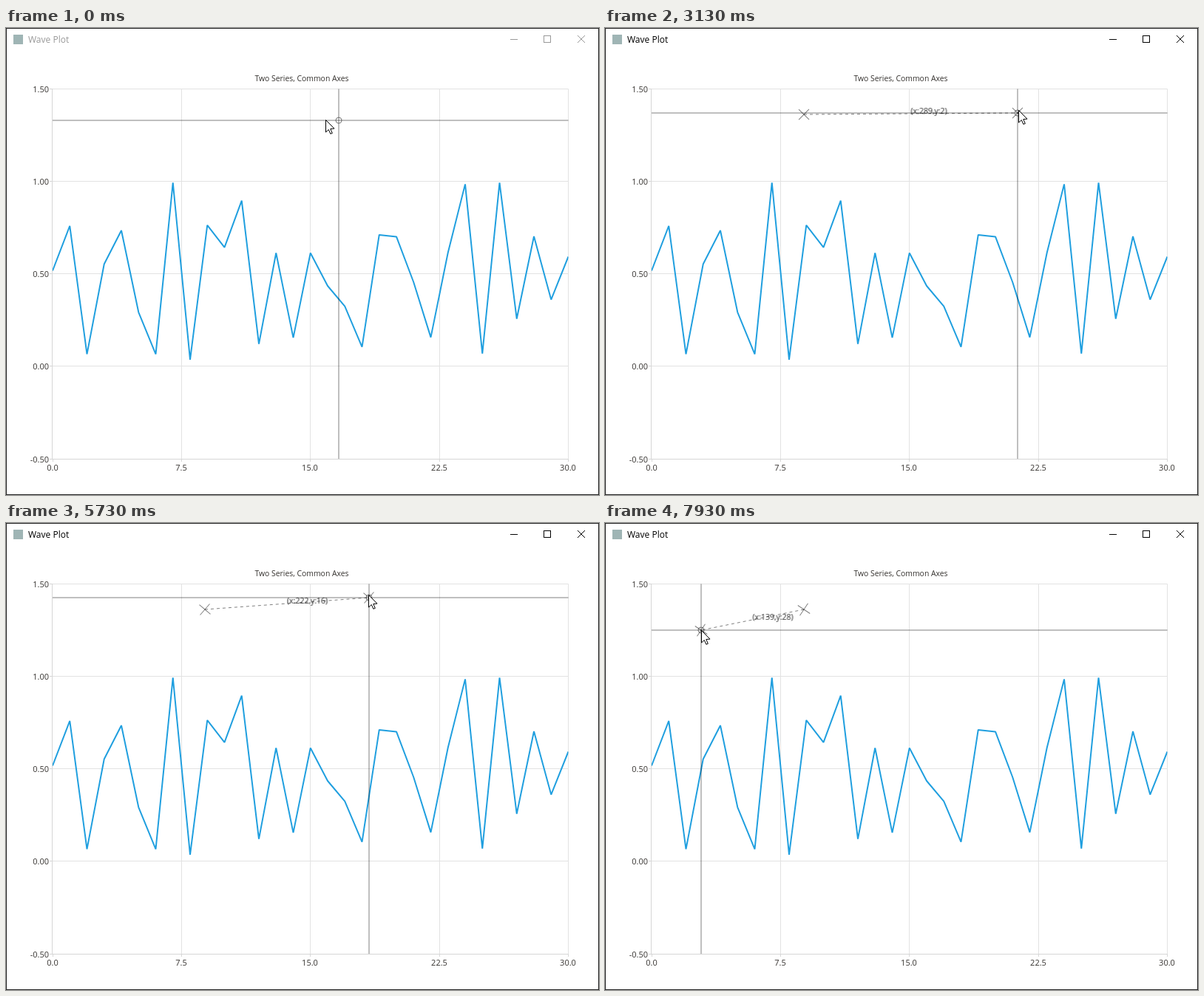
Recreate the animation shown at these times as an HTML page with a canvas. Size 802x632 px, loop 8 s.

```html
<!DOCTYPE html>
<html lang="en">
<head>
<meta charset="utf-8">
<title>Wave Plot</title>
<style>
  html, body { margin: 0; width: 100%; height: 100%; overflow: hidden; background: #fff; }
  canvas { display: block; }
</style>
</head>
<body>
<canvas id="stage" width="802" height="632"></canvas>
<script>
const ctx = document.getElementById('stage').getContext('2d');
const W = 802, H = 632, LOOP = 8000, STEP = 1000 / 15;
const PLOT = { left: 63, top: 82.5, right: 760.5, bottom: 583 };
const Y_MAX = 1.5, Y_SPAN = 2, X_SPAN = 30;
const FONT = '"Open Sans", "Noto Sans", sans-serif';
const SHADE = 'rgba(0,0,0,0.5)';
const ACTIVE_STEP = 14, PRESS_STEP = 15;
const ANCHOR = { x: 269, y: 117 };

// Plotted samples, one per unit of x
const SERIES = [
  .517, .759, .066, .553, .735, .293, .066, .993, .036, .763, .643,
  .896, .121, .613, .155, .613, .435, .325, .105, .711, .701,
  .455, .157, .615, .985, .069, .993, .257, .703, .361, .593
];

// Key points of the drag: step, x, y; a repeated point is a rest
const PATH = [
  [0, 450, 125], [11, 269, 117], [20, 269, 117], [35, 480, 205],
  [49, 560, 110], [53, 560, 110], [60, 486, 219], [86, 491, 101],
  [92, 480, 85], [104, 345, 241], [119, 130, 145]
];

const slope = (a, b, k) => (b[k] - a[k]) / (b[0] - a[0]);

// Tangent of the parabola through neighbouring points, zero at rests
function tangent(i, k) {
  const prev = PATH[i - 1], here = PATH[i], next = PATH[i + 1];
  if (!next) return 0;
  const after = slope(here, next, k);
  if (!prev) return after;
  const before = slope(prev, here, k);
  if (!before || !after) return 0;
  const w = (here[0] - prev[0]) / (next[0] - prev[0]);
  return before * (1 - w) + after * w;
}

function pointAt(step) {
  step = Math.min(step, PATH[PATH.length - 1][0]);
  let i = 0;
  while (i < PATH.length - 2 && PATH[i + 1][0] <= step) i++;
  const a = PATH[i], b = PATH[i + 1], span = b[0] - a[0];
  const s = (step - a[0]) / span, r = 1 - s;
  const ease = s * s * (3 - 2 * s);
  const axis = k => Math.round(a[k] + (b[k] - a[k]) * ease +
    span * s * r * (tangent(i, k) * r - tangent(i + 1, k) * s));
  return { x: axis(1), y: axis(2) };
}

function line(x1, y1, x2, y2) {
  ctx.beginPath();
  ctx.moveTo(x1, y1);
  ctx.lineTo(x2, y2);
  ctx.stroke();
}

function text(str, x, y, size, align = 'left') {
  ctx.font = `${size}px ${FONT}`;
  ctx.textAlign = align;
  ctx.fillText(str, x, y);
}

function drawWindow(active) {
  ctx.fillStyle = '#fff';
  ctx.fillRect(0, 0, W, H);
  ctx.lineWidth = 1;
  ctx.strokeStyle = '#222';
  ctx.strokeRect(0.5, 0.5, W - 1, H - 1);

  ctx.fillStyle = '#9fb5b5';
  ctx.fillRect(10, 9, 13, 13);

  ctx.fillStyle = ctx.strokeStyle = active ? '#000' : '#999';
  text('Wave Plot', 30, 20, 12);
  line(682, 15.5, 692, 15.5);
  ctx.strokeRect(727.5, 10.5, 9, 9);
  line(773, 10, 783, 20);
  line(783, 10, 773, 20);
}

function drawAxes() {
  const { left, top, right, bottom } = PLOT;
  ctx.lineWidth = 1;
  ctx.fillStyle = '#35322f';
  text('Two Series, Common Axes', 400, 72, 10.4, 'center');

  for (let i = 0; i <= 4; i++) {
    const x = Math.floor(left + (right - left) * i / 4);
    const y = Math.floor(top + (bottom - top) * i / 4);
    ctx.strokeStyle = '#e2e2e2';
    if (i > 0) line(x + 0.5, top, x + 0.5, bottom);
    if (i < 4) line(left, y + 0.5, right, y + 0.5);
    ctx.strokeStyle = '#d6d6d6';
    line(x + 0.5, bottom, x + 0.5, bottom + 4);
    line(left - 4, y + 0.5, left, y + 0.5);
    text((Y_MAX - Y_SPAN * i / 4).toFixed(2), 58, y + 5, 11, 'right');
    text((X_SPAN * i / 4).toFixed(1), x, 599, 11, 'center');
  }
  line(left - 0.5, top, left - 0.5, bottom);
  line(left, bottom + 0.5, right, bottom + 0.5);
}

function drawSeries() {
  const { left, top, right, bottom } = PLOT;
  ctx.save();
  ctx.beginPath();
  ctx.rect(left, top, right - left, bottom - top);
  ctx.clip();
  ctx.beginPath();
  SERIES.forEach((v, i) => ctx.lineTo(
    left + (right - left) * i / X_SPAN,
    top + (bottom - top) * (Y_MAX - v) / Y_SPAN));
  ctx.strokeStyle = '#209fdf';
  ctx.lineWidth = 2;
  ctx.lineJoin = 'bevel';
  ctx.stroke();
  ctx.restore();
}

function drawCrosshair({ x, y }) {
  ctx.lineWidth = 1;
  ctx.strokeStyle = SHADE;
  line(x, PLOT.top, x, PLOT.bottom);
  line(PLOT.left, y, PLOT.right, y);
  ctx.beginPath();
  ctx.arc(x, y, 4, 0, Math.PI * 2);
  ctx.stroke();
}

function drawMark({ x, y }, angle) {
  ctx.save();
  ctx.translate(x, y);
  ctx.rotate(angle);
  line(-7, -7, 7, 7);
  line(-7, 7, 7, -7);
  ctx.restore();
}

function drawRuler(end) {
  const dx = end.x - ANCHOR.x, dy = end.y - ANCHOR.y;
  ctx.lineWidth = 1;
  ctx.strokeStyle = SHADE;
  if (dx || dy) {
    const angle = Math.atan2(dy, dx);
    drawMark(ANCHOR, angle);
    drawMark(end, angle);
    ctx.setLineDash([4, 4]);
    line(ANCHOR.x, ANCHOR.y, end.x, end.y);
    ctx.setLineDash([]);
  }
  const label = `(x:${Math.abs(dx)},y:${Math.abs(dy)})`;
  const x = ANCHOR.x + dx / 2, y = Math.round(ANCHOR.y + dy / 2);
  ctx.fillStyle = 'rgba(0,0,0,0.45)';
  text(label, x - 0.5, y, 10.5);
  text(label, x + 0.5, y, 10.5);
}

function drawPointer({ x, y }) {
  const shape = [[0, 0], [0, 16.5], [3.8, 13], [6.4, 18.8], [8.8, 17.8], [6.3, 12], [11.5, 11.6]];
  ctx.beginPath();
  shape.forEach(([px, py]) => ctx.lineTo(x + px + 0.5, y + py + 0.5));
  ctx.closePath();
  ctx.fillStyle = '#fff';
  ctx.strokeStyle = '#000';
  ctx.lineWidth = 1;
  ctx.fill();
  ctx.stroke();
}

function render(ms) {
  const step = Math.floor(((ms + 5) % LOOP) / STEP);
  const pos = pointAt(step);
  drawWindow(step >= ACTIVE_STEP);
  drawAxes();
  drawSeries();
  drawCrosshair(pos);
  if (step >= PRESS_STEP) drawRuler(pos);
  // The crosshair trails the pointer by one step
  drawPointer(pointAt(step + 1));
}

const start = performance.now();
function tick() {
  render(performance.now() - start);
  requestAnimationFrame(tick);
}
tick();
</script>
</body>
</html>
```
